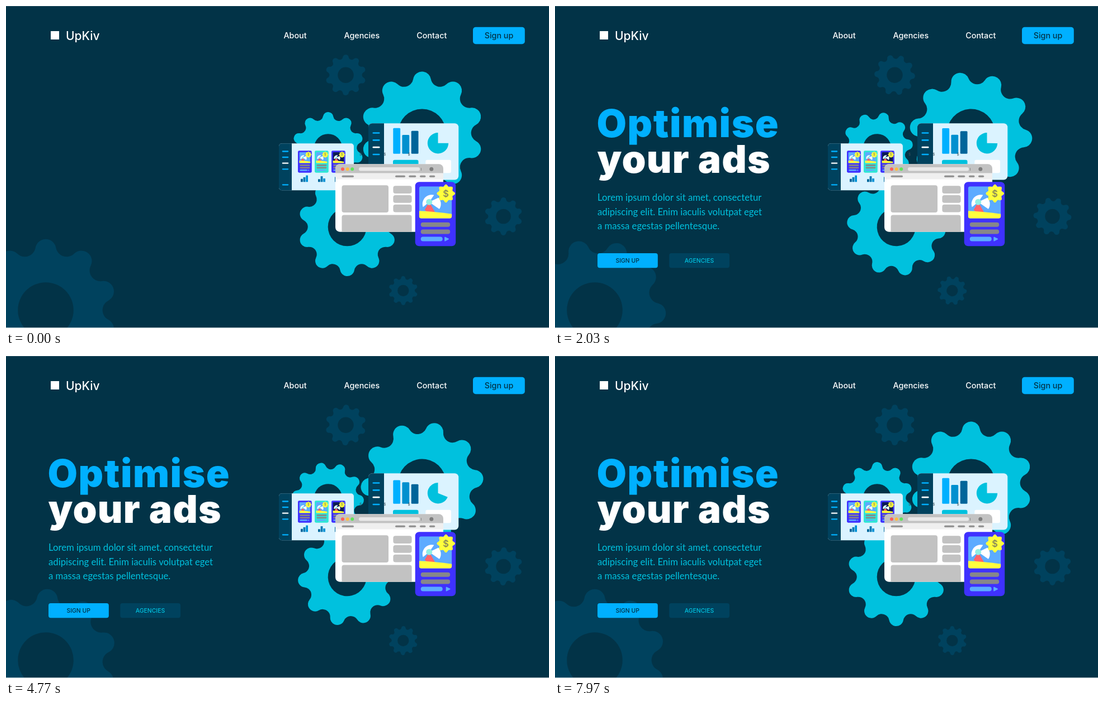
An HTML page with a canvas for the animation above (8000 ms loop, 971x577 px).

```html
<!DOCTYPE html>
<html lang="en">
<head>
<meta charset="utf-8">
<title>Optimise your ads</title>
<style>
html, body { margin: 0; width: 100%; height: 100%; overflow: hidden; background: #023347; }
canvas { display: block; width: 100vw; height: 100vh; }
</style>
</head>
<body>
<canvas id="stage" width="971" height="577"></canvas>
<script>
const ctx = document.getElementById('stage').getContext('2d');
const LOOP = 8000, INTRO = 5000, TAU = Math.PI * 2;
const BG = '#023347', DEEP = '#00425e', BLUE = '#00b0ff', TEAL = '#00c1de';
const ICE = '#dbf3ff', GREY = '#c2c2c2', SKY = '#5cabff', YELLOW = '#ffff3d', VIOLET = '#3f31ff';
const UI = 'Inter, sans-serif';

// cubic-bezier(.42, 0, .58, 1)
function ease(x) {
  if (x <= 0) return 0;
  if (x >= 1) return 1;
  let lo = 0, hi = 1, s = 0.5;
  for (let i = 0; i < 24; i++) {
    s = (lo + hi) / 2;
    const r = 1 - s;
    const bx = 3 * r * r * s * 0.42 + 3 * r * s * s * 0.58 + s * s * s;
    if (bx < x) lo = s; else hi = s;
  }
  return s * s * (3 - 2 * s);
}

const span = (t, from, to) => ease((t - from) / (to - from));

function box(x, y, w, h, r, color) {
  ctx.fillStyle = color;
  ctx.beginPath();
  ctx.roundRect(x, y, w, h, r);
  ctx.fill();
}

function disc(x, y, r, color) {
  ctx.fillStyle = color;
  ctx.beginPath();
  ctx.arc(x, y, r, 0, TAU);
  ctx.fill();
}

function wedge(x, y, r, from, to, color) {
  ctx.fillStyle = color;
  ctx.beginPath();
  ctx.moveTo(x, y);
  ctx.arc(x, y, r, from * TAU / 360, to * TAU / 360);
  ctx.closePath();
  ctx.fill();
}

function label(str, x, y, font, color, align = 'left', spacing = 0) {
  ctx.font = font;
  ctx.letterSpacing = spacing + 'px';
  ctx.fillStyle = color;
  ctx.textAlign = align;
  ctx.fillText(str, x, y);
}

// Ten round teeth joined by tangent hollows, outer radius 109.5.
function makeGear() {
  const path = new Path2D(), step = TAU / 10, toothR = 16, holeR = 42.8;
  const polar = (r, a) => [r * Math.sin(a), -r * Math.cos(a)];
  for (let i = 0; i < 10; i++) {
    const a = i * step;
    const [tx, ty] = polar(93.5, a), [nx, ny] = polar(93.5, a + step);
    const [px, py] = polar(104, a - step / 2), [vx, vy] = polar(104, a + step / 2);
    const hollowR = Math.hypot(vx - tx, vy - ty) - toothR;
    path.arc(tx, ty, toothR, Math.atan2(py - ty, px - tx), Math.atan2(vy - ty, vx - tx));
    path.arc(vx, vy, hollowR, Math.atan2(ty - vy, tx - vx), Math.atan2(ny - vy, nx - vx), true);
  }
  path.closePath();
  path.moveTo(holeR, 0);
  path.arc(0, 0, holeR, 0, TAU);
  return path;
}
const gearPath = makeGear();

function gear(x, y, outer, angle, color) {
  ctx.save();
  ctx.translate(x, y);
  ctx.rotate(angle);
  ctx.scale(outer / 109.5, outer / 109.5);
  ctx.fillStyle = color;
  ctx.fill(gearPath, 'evenodd');
  ctx.restore();
}

function gears(t) {
  const slow = -TAU * ease(t / INTRO), main = TAU * ease(t / LOOP);
  gear(71, 545, 127.3, slow, DEEP);
  gear(607.5, 123.7, 36.4, slow, DEEP);
  gear(889.5, 377, 34, slow, DEEP);
  gear(710.3, 510, 26, slow, DEEP);
  gear(744, 227.4, 109.8, -main, TEAL);
  gear(610.2, 395.8, 88.3, -main, TEAL);
  gear(576, 254.2, 64.1, main, TEAL);
}

function header() {
  box(80, 45, 15, 15, 0, '#fff');
  label('UpKiv', 107, 60.5, `500 21px ${UI}`, '#fff');
  const font = `500 14.3px ${UI}`;
  label('About', 517, 58.3, font, '#fff', 'center');
  label('Agencies', 636.3, 58.3, font, '#fff', 'center');
  label('Contact', 761.3, 58.3, font, '#fff', 'center');
  box(835, 37.7, 92.8, 30.6, 5, BLUE);
  label('Sign up', 881.5, 58.3, font, BG, 'center');
}

function copy(t) {
  // The headline rises from below the stage.
  const dy = 426 * (1 - span(t, 0, 2000));
  const big = `900 69px ${UI}`;
  label('Optimise', 74.5, 235 + dy, big, BLUE, 'left', 1.6);
  label('your ads', 75.5, 298.5 + dy, big, '#fff', 'left', 1.2);

  ctx.globalAlpha = span(t, 1000, 2000);
  [
    'Lorem ipsum dolor sit amet, consectetur',
    'adipiscing elit. Enim iaculis volutpat eget',
    'a massa egestas pellentesque.'
  ].forEach((line, i) => label(line, 76, 349 + i * 25.7, '16.7px Lato, sans-serif', TEAL));

  ctx.globalAlpha = span(t, 1170, 2000);
  const small = `500 10.4px ${UI}`;
  box(76, 443, 107.8, 26.3, 4, BLUE);
  label('SIGN UP', 129.7, 459.8, small, BG, 'center');
  box(204.2, 443, 107.8, 26.3, 4, DEEP);
  label('AGENCIES', 258, 459.8, small, TEAL, 'center');
  ctx.globalAlpha = 1;
}

function dashes(x, w, h, ys) {
  ys.forEach((y, i) => box(x, y - h / 2, w, h, h / 2, i === 2 ? '#fff' : BLUE));
}

function panel(x, y, w, h, r, side) {
  box(x, y, w, h, r, ICE);
  box(x, y, side, h, [r, 0, 0, r], DEEP);
}

function badge(x, y) {
  ctx.fillStyle = YELLOW;
  ctx.beginPath();
  for (let i = 0; i < 96; i++) {
    const a = i / 96 * TAU, r = 14.5 + 1.8 * Math.cos(8 * a);
    ctx.lineTo(x + r * Math.sin(a), y - r * Math.cos(a));
  }
  ctx.fill();
  label('$', x, y + 6, `500 16.5px ${UI}`, '#7d7d5c', 'center');
}

function beachBall() {
  ctx.save();
  ctx.beginPath();
  ctx.arc(29.5, 39.5, 16.5, 0, TAU);
  ctx.clip();
  wedge(25, 36, 40, 140, 305, '#fff');
  wedge(25, 36, 40, 335, 395, '#fff');
  wedge(25, 36, 40, 60, 120, '#ff6469');
  ctx.restore();
  disc(25, 36, 5.5, '#8ff0e4');
}

// Ad card in its own units, 72.5 by 115.
function card(x, y, scale, color, sky, push) {
  ctx.save();
  ctx.translate(x, y);
  ctx.scale(scale, scale);
  box(0, 0, 72.5, 115, 7, color);
  ctx.save();
  ctx.beginPath();
  ctx.roundRect(7, 8, 58.5, 57.2, 4);
  ctx.clip();
  ctx.fillStyle = sky;
  ctx.fillRect(7, 8, 59, 58);
  beachBall();
  ctx.fillStyle = YELLOW;
  ctx.beginPath();
  ctx.moveTo(7, 52);
  ctx.quadraticCurveTo(30, 52.5, 66, 57.5);
  ctx.lineTo(66, 66);
  ctx.lineTo(7, 66);
  ctx.fill();
  ctx.restore();
  badge(55, 20.7);
  box(10, 72.5, 52.5, 8, 4, '#87878a');
  box(10, 85.2, 52.5, 8, 4, '#87878a');
  box(10, 98.2, 39, 8, 4, SKY);
  ctx.fillStyle = ctx.strokeStyle = SKY;
  ctx.lineWidth = 1.5;
  ctx.lineJoin = 'round';
  ctx.beginPath();
  ctx.moveTo(53.2 + push, 99.2);
  ctx.lineTo(59.5 + push, 102.3);
  ctx.lineTo(53.2 + push, 105.6);
  ctx.closePath();
  ctx.fill();
  ctx.stroke();
  ctx.restore();
}

function miniChart(x, heights) {
  const tones = ['#00659a', '#0079b3', '#0092d6'];
  heights.forEach((h, i) => box(x + i * 4.6, 315.2 - h, 3.8, h, 0.5, tones[i]));
}

function adsPanel() {
  panel(488, 246.3, 134, 84, 5, 23);
  dashes(493.7, 11.6, 2.3, [260.5, 271, 281.7, 292.3, 320.3]);
  card(522, 259.3, 0.342, VIOLET, SKY, 0);
  card(552, 259.3, 0.342, '#2ee6d6', SKY, 0);
  card(582, 259.3, 0.342, VIOLET, '#0b1a52', 0);
  miniChart(527, [5.5, 8.5, 11.8]);
  miniChart(558, [5, 10.3, 6.3]);
  miniChart(588, [9, 6, 10]);
}

function statsPanel(u) {
  panel(648, 210.3, 161.3, 101.3, 7, 28);
  dashes(655.5, 13, 2.7, [227.5, 240.4, 253.2, 266]);
  const bar = (x, top, color) => box(x, top, 12.8, 264.7 - top, 1.5, color);
  bar(692.3, 218.8 + 10.3 * u, BLUE);
  bar(708.4, 231 - 13.3 * u, '#0090cf');
  bar(724.7, 223.8 + 16.5 * u, '#00659a');
  wedge(772.5, 245.7, 18.7, 62 * u, 270, TEAL);
  box(692, 275.8, 45.5, 23.5, 3, TEAL);
  box(750.3, 275.8, 45.7, 23.5, 3, '#fff');
}

function browser() {
  ctx.save();
  ctx.beginPath();
  ctx.roundRect(589, 283.2, 193, 121.5, 8);
  ctx.clip();
  ctx.fillStyle = '#fff';
  ctx.fillRect(589, 283, 193, 122);
  ctx.fillStyle = GREY;
  ctx.fillRect(589, 283, 193, 16.7);
  ctx.fillStyle = '#efefef';
  ctx.fillRect(589, 299.7, 193, 10.8);
  disc(602, 292.2, 3, '#ff6058');
  disc(610.6, 292.2, 3, '#ffbd3e');
  disc(619.2, 292.2, 3, '#5fe35a');
  box(631, 289, 109, 6.6, 3.3, '#e8e8e8');
  box(742, 290, 1, 5, 0.5, '#8c8c8c');
  disc(760.8, 292.3, 3.5, '#7d7d7d');
  [[600.5, 21.5], [696, 18], [720.3, 13], [740, 10.5], [757, 10.2]]
    .forEach(([x, w]) => box(x, 303.4, w, 3.6, 1.8, '#949494'));
  box(600.5, 321.2, 83.5, 48.8, 4, GREY);
  [322.3, 339, 355.8].forEach(y => box(692.4, y, 33.2, 13.8, 4, GREY));
  box(600.5, 374.5, 125.1, 40, 4, GREY);
  ctx.restore();
}

function draw(t) {
  ctx.fillStyle = BG;
  ctx.fillRect(0, 0, 971, 577);
  gears(t);
  header();
  copy(t);

  // Charts swing out and back once a second, then rest.
  const beat = t < INTRO ? (t + 20) % 1000 / 500 : 0;
  const u = ease(beat < 1 ? beat : 2 - beat);
  adsPanel();
  statsPanel(u);
  [634, 677.3, 720.5].forEach(x => label('$', x, 268.3, `6.5px ${UI}`, '#37535f', 'center'));
  browser();
  card(731.7, 315.2, 1, VIOLET, SKY, 7 * u);

  ctx.fillStyle = 'rgba(255,255,255,.2)';
  ctx.fillRect(0, 0, 971, 1);
  ctx.fillStyle = 'rgba(255,255,255,.7)';
  ctx.fillRect(0, 576, 971, 1);
}

function tick() {
  draw(performance.now() % LOOP);
  requestAnimationFrame(tick);
}
tick();
</script>
</body>
</html>
```
